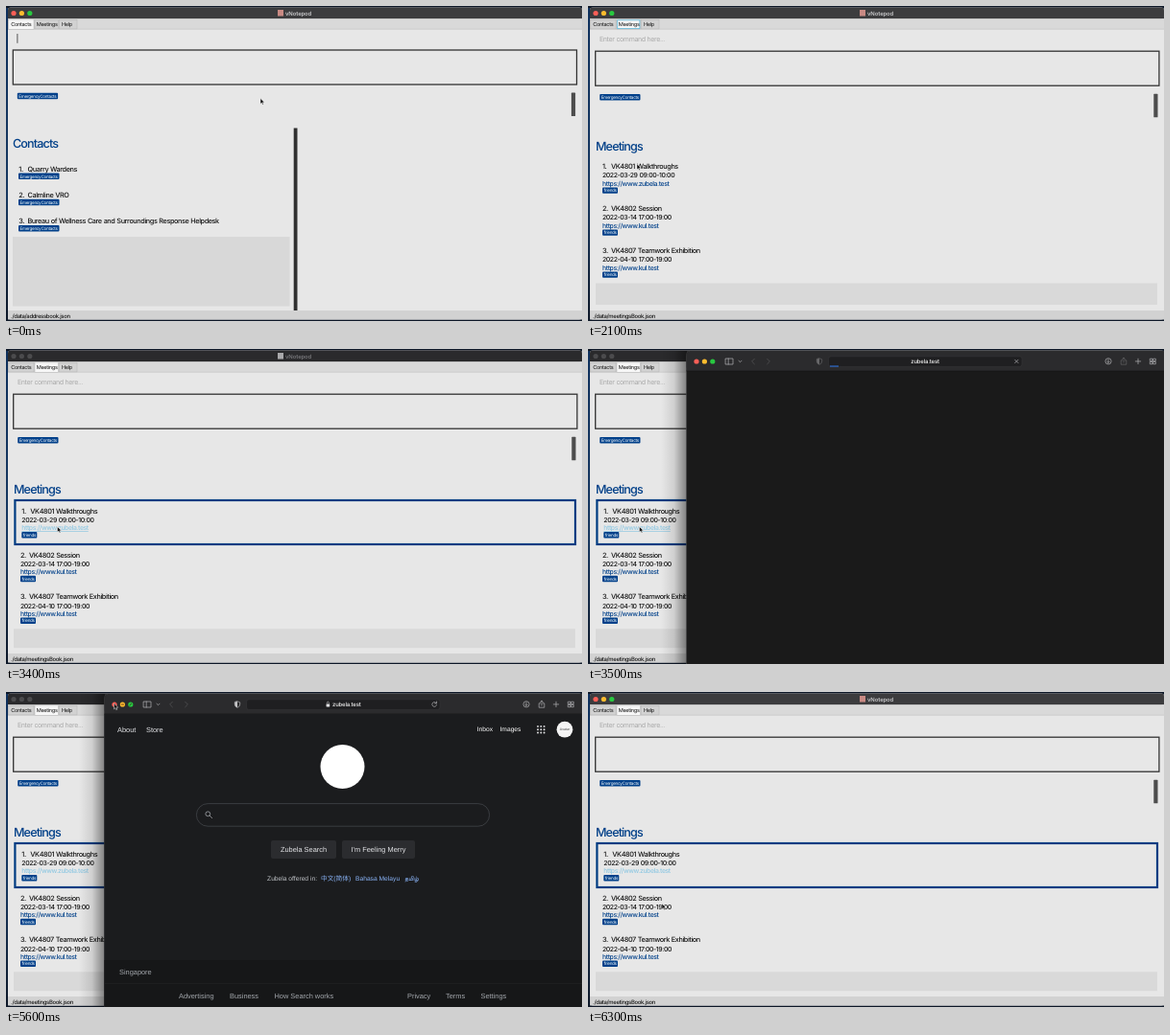
Animation, 600 px wide and 329 px high, one loop 6400 ms. Source, as an HTML page:

```html
<!DOCTYPE html>
<html lang="en">
<head>
<meta charset="utf-8">
<title>Meeting links</title>
<style>
  html, body { margin: 0; width: 100%; height: 100%; overflow: hidden; background: #0c1626; }
  svg { display: block; width: 100%; height: 100%; }
  text { font-family: Inter, "Noto Sans", sans-serif; fill: #141414; white-space: pre; text-rendering: geometricPrecision; }
  .bar { font-size: 5.9px; font-weight: 600; letter-spacing: -.1px; fill: #c9c9cb; }
  .tab { font-size: 5.6px; letter-spacing: -.32px; }
  .hint { font-size: 7px; letter-spacing: -.36px; word-spacing: .3px; fill: #a9a9a9; }
  .head { font-size: 12.6px; font-weight: 500; letter-spacing: -.88px; fill: #003f88; }
  .item { font-size: 7.3px; font-weight: 500; letter-spacing: -.42px; word-spacing: .4px; }
  .line { font-size: 6.9px; font-weight: 500; letter-spacing: -.42px; word-spacing: .6px; }
  .link { fill: #00408a; }
  .link.seen { fill: #90c8e2; }
  .tag { font-size: 4.6px; letter-spacing: -.28px; fill: #fff; }
  .foot { font-size: 6px; font-weight: 500; letter-spacing: -.36px; }
  .url { font-size: 6px; font-weight: 500; letter-spacing: -.2px; fill: #f0f0f0; }
  .web { font-family: "Liberation Sans", Arial, sans-serif; font-size: 7.4px; fill: #e4e5e8; }
  .small { font-size: 6.7px; }
  .dim { fill: #a4a8ad; }
  .lang { font-family: "Liberation Sans", "Noto Sans CJK SC", "Noto Sans CJK", "Noto Sans", sans-serif; fill: #8ab4f8; }
  .icon { fill: none; stroke: #bcbcbe; stroke-width: .65; stroke-linecap: round; stroke-linejoin: round; }
  .faint { stroke: #5a5a5c; }
</style>
</head>
<body>
<svg id="stage" viewBox="0 0 600 329" preserveAspectRatio="none"></svg>
<script>
const LOOP = 6400, STEP = 100;
const AT = { tab: 600, select: 2500, click: 3300, blur: 3400, open: 3500, load: 3900, rest: 4900, hover: 5400, close: 5700 };

const rect = (x, y, w, h, fill, more = "") =>
  `<rect x="${x}" y="${y}" width="${w}" height="${h}" fill="${fill}" ${more}/>`;
const dot = (x, y, r, fill, more = "") => `<circle cx="${x}" cy="${y}" r="${r}" fill="${fill}" ${more}/>`;
const text = (x, y, str, cls, more = "") => `<text x="${x}" y="${y}" class="${cls}" ${more}>${str}</text>`;
const icon = (d, cls = "") => `<path class="icon ${cls}" d="${d}"/>`;
const group = (id, body) => `<g id="${id}">${body}</g>`;
const tag = (x, y, w, str) => rect(x, y, w, 6.4, "#00408a", 'rx="1"') + text(x + 1.5, y + 4.9, str, "tag");
const lights = (x, y, colors) => colors.map((c, i) => dot(x + i * 8.4, y, 2.6, c)).join("");
const LIVE = ["#ff5f57", "#febc2e", "#28c840"];
const GREY = ["#4b4b4d", "#4b4b4d", "#4b4b4d"];

const defs = `<defs>
  <linearGradient id="desk" x2="0" y2="1"><stop stop-color="#0d2f5c"/><stop offset=".6" stop-color="#16375f"/><stop offset="1" stop-color="#0c1626"/></linearGradient>
  <linearGradient id="shade"><stop stop-opacity="0"/><stop offset=".5" stop-opacity=".1"/><stop offset="1" stop-opacity=".45"/></linearGradient>
</defs>`;

function titleBar(id, fill, colors, mark, ink) {
  return group(id, rect(2, 1.5, 598, 11.8, fill, 'rx="3"') + rect(2, 7, 598, 6.3, fill) +
    lights(8, 7.5, colors) + rect(283, 4, 6, 6.5, mark) +
    text(291, 9.6, "vNotepod", "bar", `style="fill:${ink}"`));
}

function contact(y, n, name) {
  return text(13.3, y, n + ".", "item") + text(22.5, y, name, "item") +
    tag(13, y + 2, 42.5, "EmergencyContacts");
}

function meeting(id, n, name, when, url) {
  return group(id,
    text(15, 170.3, n + ".", "item") + text(24, 170.3, name, "item") +
    text(15, 179.4, when, "line") +
    text(15, 187.6, url, "line link") + tag(15, 189.4, 16, "friends"));
}

const planner =
  rect(2, 1.5, 598, 326, "#e7e7e7", 'rx="3"') +
  titleBar("liveBar", "#3c3c3e", LIVE, "#c98a84", "#c9c9cb") +
  titleBar("greyBar", "#2a2a2c", GREY, "#a9a9ab", "#77777a") +
  rect(2, 13.3, 598, 11, "#d9d9d9") + rect(2, 23.8, 598, .6, "#bdbdbd") +
  [[2.5, 26.5], [30, 24.5], [55.5, 18.5]].map(([x, w]) =>
    rect(x, 14.3, w, 9.6, "#d2d2d2", 'stroke="#b5b5b5" stroke-width=".5"')).join("") +
  rect(2.5, 14, 26.5, 10.4, "#f6f6f6", 'id="tabOn" stroke="#b5b5b5" stroke-width=".5"') +
  rect(30.7, 14.8, 23.2, 8.8, "none", 'id="tabRing" stroke="#5db6d8" stroke-width=".8"') +
  text(5.2, 21, "Contacts", "tab") + text(31.7, 21, "Meetings", "tab") + text(58, 21, "Help", "tab") +
  rect(11.5, 29, .8, 9.8, "#333", 'id="caret"') +
  text(12, 37, "Enter command here...", "hint", 'id="hint"') +
  group("top", rect(7.7, 47.2, 587.2, 36, "none", 'stroke="#333" stroke-width="1.3"') +
    tag(12.2, 92, 42.3, "EmergencyContacts") + rect(589.3, 91.8, 4.2, 24.5, "#4d4d4d", 'rx=".6"')) +
  group("contacts", text(7, 148.3, "Contacts", "head") +
    contact(172.6, 1, "Quarry Wardens") +
    contact(199.8, 2, "Calmline VRO") +
    contact(227, 3, "Bureau of Wellness Care and Surroundings Response Helpdesk") +
    rect(7, 241, 288.5, 72.5, "#d8d8d8") + rect(299.7, 127.5, 3.8, 190.5, "#303030")) +
  group("meetings", text(8, 150.5, "Meetings", "head") +
    rect(9.4, 158, 583.6, 46, "none", 'id="frame" stroke="#003c82" stroke-width="2.2"') +
    meeting("m0", 1, "VK4801 Walkthroughs", "2022-03-29 09:00-10:00", "https://www.zubela.test") +
    meeting("m1", 2, "VK4802 Session", "2022-03-14 17:00-19:00", "https://www.kul.test") +
    meeting("m2", 3, "VK4807 Teamwork Exhibition", "2022-04-10 17:00-19:00", "https://www.kul.test") +
    rect(8, 290, 585, 22, "#d9d9d9", 'id="blank"')) +
  rect(2, 318, 598, 9.5, "#d2d2d2") + text(5, 325.6, "", "foot", 'id="path"');

function appDots() {
  let s = "";
  for (let i = 0; i < 9; i++) s += dot(554 + (i % 3) * 3.3, 35.9 + Math.floor(i / 3) * 3.3, .95, "#e4e4e6");
  return s;
}

const page =
  rect(102.5, 23, 497.5, 306, "#1b1c1e") + rect(102.5, 280, 497.5, 49, "#161718") +
  rect(102.5, 304, 497.5, .5, "#242527") +
  text(116, 41.5, "About", "web") + text(146, 41.5, "Store", "web") +
  text(507, 41.4, "Inbox", "web small", 'text-anchor="end" style="fill:#fff"') +
  text(514.5, 41.4, "Images", "web small", 'style="fill:#fff"') +
  appDots() + dot(582, 39.2, 8.4, "#f4f4f4") +
  text(582, 40.4, "Avatar", "web", 'text-anchor="middle" style="font-size:3.6px;fill:#444"') +
  dot(350.5, 78, 23, "#fff") +
  rect(198.4, 116.6, 305.2, 23.6, "#1b1c1e", 'rx="11.8" stroke="#505358" stroke-width=".6"') +
  dot(210.3, 127.3, 2.4, "none", 'stroke="#a2a6ab" stroke-width=".8"') + icon("M212.2 129.2l2.5 2.5") +
  rect(223, 123.4, .7, 9.4, "#b4b6b9", 'id="webCaret"') +
  rect(276, 155, 68, 19, "#2b2c2f", 'rx="2"') + rect(350, 155, 76, 19, "#2b2c2f", 'rx="2"') +
  text(310, 167.1, "Zubela Search", "web", 'text-anchor="middle"') +
  text(388, 167.1, "I'm Feeling Merry", "web", 'text-anchor="middle"') +
  text(324, 196.5, "Zubela offered in:", "web small", 'text-anchor="end" style="fill:#c2c5c9"') +
  text(328, 196.5, "中文(简体)", "web small lang") + text(364, 196.5, "Bahasa Melayu", "web small lang") +
  text(415, 196.5, "தமிழ்", "web small lang") +
  text(118, 295.4, "Singapore", "web dim") +
  [[180, "Advertising"], [233, "Business"], [279.5, "How Search works"], [418, "Privacy"], [458, "Terms"], [494.5, "Settings"]]
    .map(([x, s]) => text(x, 320.3, s, "web dim")).join("");

const browser =
  rect(76, 2, 27, 327, "url(#shade)") +
  rect(102.5, 2.2, 505, 340, "#1a1a1a", 'rx="4" stroke="#4a4a4c" stroke-width=".6"') +
  rect(102.8, 2.5, 504, 20.5, "#2b2b2d", 'rx="4"') + rect(102.8, 12, 504, 11, "#2b2b2d") +
  rect(102.5, 22.7, 498, .6, "#111") +
  lights(113, 13, LIVE) +
  group("glyphs", `<path d="M111.8 11.8l2.4 2.4M114.2 11.8l-2.4 2.4M119.9 13h3M128.6 14.2l2.4-2.4" stroke="#3a1512" stroke-width=".7"/>`) +
  icon("M143.5 10h7.5v6h-7.5zM146.2 10v6M157 12.2l1.5 1.5l1.5-1.5") +
  icon("M173.4 10.2l-2.8 2.8l2.8 2.8M186.6 10.2l2.8 2.8l-2.8 2.8", "faint") +
  group("shield", icon("M241 9.8l2.7 1v2.2q0 2.2-2.7 3.3q-2.7-1.1-2.7-3.3v-2.2z") +
    `<path d="M241 9.8l-2.7 1v2.2q0 2.2 2.7 3.3z" fill="#c4c4c6"/>`) +
  rect(250.5, 7.8, 201.5, 10.6, "#1f1f21", 'rx="2.4" stroke="#3a3a3c" stroke-width=".5"') +
  group("loading", text(351, 15.2, "zubela.test", "url", 'text-anchor="middle"') +
    icon("M444.7 11.2l3.4 3.4M448.1 11.2l-3.4 3.4") + rect(252, 17.5, 9, 1, "#2f7bf0", 'id="progress"')) +
  group("loaded", rect(333.6, 12.4, 3.6, 3, "#e0e0e2", 'rx=".4"') +
    icon("M334.4 12.4v-1q0-1.2 1-1.2t1 1.2v1") + text(340, 15.2, "zubela.test", "url") +
    icon("M448.3 11.6a2.4 2.4 0 1 0 .3 2M448.6 9.9v2h-2")) +
  dot(542, 12.8, 3.1, "none", 'stroke="#bcbcbe" stroke-width=".65"') +
  icon("M542 11v3.2M540.8 13.2l1.2 1.2l1.2-1.2") +
  group("share", icon("M556.5 11.8h-1.3v4.4h5.6v-4.4h-1.3M558 14v-4.8M556.7 10.4l1.3-1.3l1.3 1.3")) +
  icon("M573 10.2v5.4M570.3 12.9h5.4M585.7 10.2h2.3v2.3h-2.3zM589 10.2h2.3v2.3h-2.3zM585.7 13.4h2.3v2.3h-2.3zM589 13.4h2.3v2.3h-2.3z") +
  group("page", page);

document.getElementById("stage").innerHTML =
  defs + rect(0, 0, 600, 329, "#0c1626") + rect(0, 2, 2, 327, "url(#desk)") + planner + group("browser", browser) +
  `<path id="mouse" d="M0 0v5.8l1.4-1.2l.9 2l1-.4l-.9-2h1.8z" fill="#0a0a0a" stroke="#f2f2f2" stroke-width=".5"/>`;

const el = {};
document.querySelectorAll("[id]").forEach(n => el[n.id] = n);
const show = (id, on) => el[id].style.display = on ? "" : "none";
const set = (id, attrs) => { for (const k in attrs) el[id].setAttribute(k, attrs[k]); };
const move = (id, x, y) => set(id, { transform: `translate(${x} ${y})` });
const link = el.m0.querySelector(".link");

// Pointer stops: time, x, y
const STOPS = [
  [0, 265, 96.5], [100, 265, 96.5], [500, 43, 18.5], [900, 43, 18.5], [1600, 51, 165],
  [2600, 51, 165], [3000, 53.5, 185.5], [3700, 53.5, 185.5], [4500, 44.5, 91.5],
  [4800, 44.5, 91.5], [5400, 112.5, 12], [5800, 112.5, 12], [6200, 77, 221], [6400, 77, 221]
];

function pointer(t) {
  const i = STOPS.findIndex(s => s[0] > t);
  const [t0, x0, y0] = STOPS[i - 1], [t1, x1, y1] = STOPS[i];
  const p = (t - t0) / (t1 - t0), e = p * p * (3 - 2 * p);
  return [x0 + (x1 - x0) * e, y0 + (y1 - y0) * e];
}

function render(t) {
  const meet = t >= AT.tab, picked = t >= AT.select;
  const away = t >= AT.blur && t < AT.close;
  const open = t >= AT.open && t < AT.close, ready = t >= AT.load;

  show("liveBar", !away);
  show("greyBar", away);
  show("contacts", !meet);
  show("meetings", meet);
  show("caret", !meet);
  show("hint", meet);
  show("tabRing", meet && !picked);
  set("tabOn", meet ? { x: 30, width: 24.5 } : { x: 2.5, width: 26.5 });
  move("top", meet ? 0 : -.4, meet ? 0 : -1.2);
  el.path.textContent = meet ? "./data/meetingsBook.json" : "./data/addressbook.json";

  show("frame", picked);
  move("m0", picked ? 1.3 : 0, picked ? 1.7 : 0);
  move("m1", 0, picked ? 47.4 : 44);
  move("m2", 0, picked ? 91.2 : 88);
  set("blank", picked ? { y: 292.3, height: 20 } : { y: 289.5, height: 22.5 });
  const seen = t >= AT.click;
  link.classList.toggle("seen", seen);
  link.style.textDecoration = seen && t < AT.rest ? "underline" : "none";

  show("browser", open);
  show("page", ready);
  show("loaded", ready);
  show("loading", !ready);
  set("progress", { width: Math.max(9, 9 + (t - AT.open) * .4) });
  el.shield.style.opacity = ready ? 1 : .4;
  el.share.style.opacity = ready ? 1 : .4;
  show("webCaret", Math.floor((t - 3700) / 500) % 2 === 0);
  show("glyphs", t >= AT.hover);

  move("mouse", ...pointer(t));
}

const start = performance.now();
function tick() {
  const t = (performance.now() - start) % LOOP;
  render(Math.floor(t / STEP) * STEP);
  requestAnimationFrame(tick);
}
render(0);
requestAnimationFrame(tick);
</script>
</body>
</html>
```
